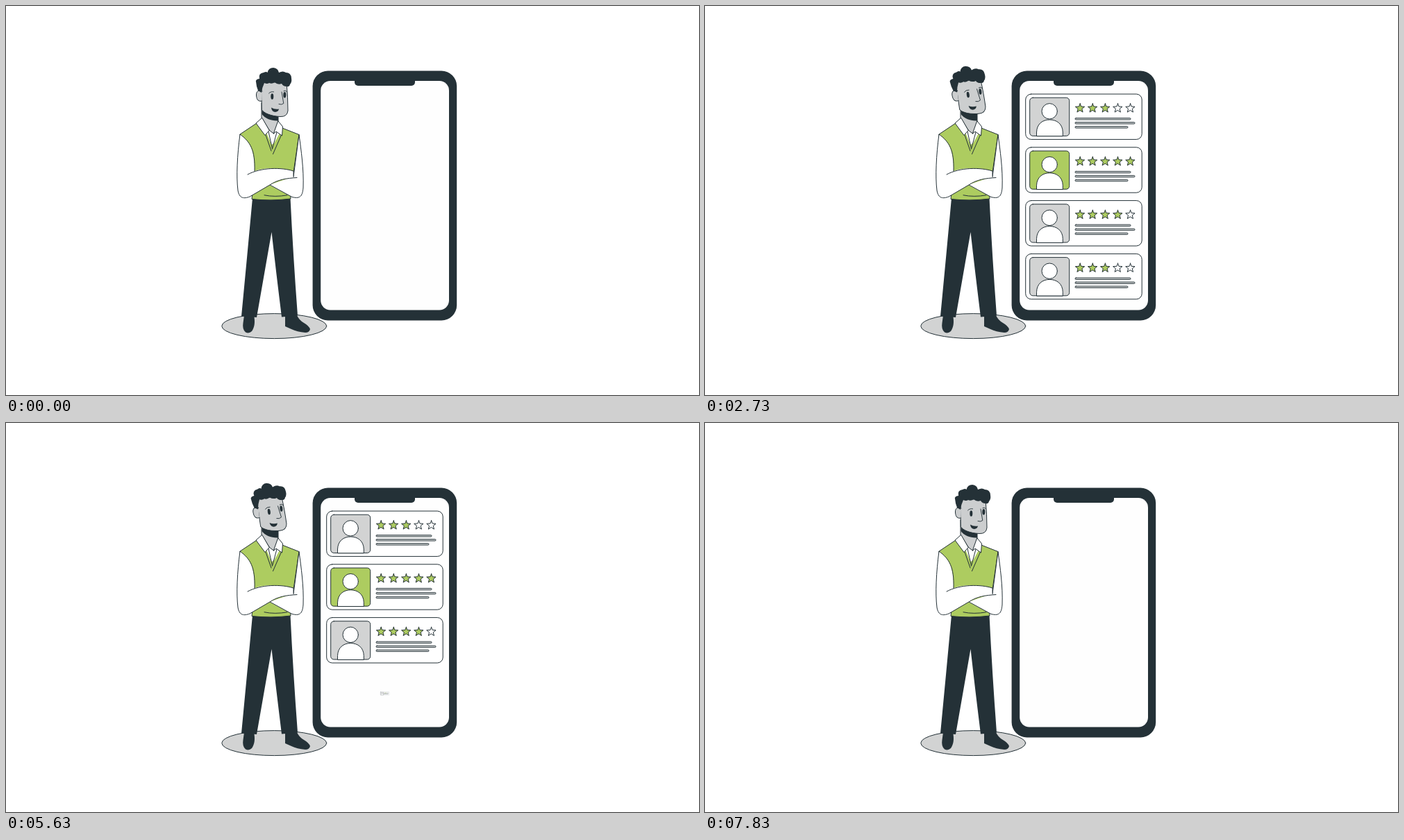
An HTML page with a canvas for the animation above (8010 ms loop, 998 by 561 pixels).

```html
<!DOCTYPE html>
<html lang="en">
<head>
<meta charset="utf-8">
<title>Reviews</title>
<style>
html, body { margin: 0; width: 100%; height: 100%; overflow: hidden; background: #fff; }
canvas { display: block; width: 998px; height: 561px; }
</style>
</head>
<body>
<canvas id="stage" width="998" height="561"></canvas>
<script>
const ctx = document.getElementById('stage').getContext('2d');
const DARK = '#243137', GREEN = '#adcc60', GREY = '#d2d3d3', SKIN = '#cccecf', WHITE = '#fff';
const LOOP = 8010, CYCLE = 4000;
const RATINGS = [3, 5, 4, 3];
const CARD_X = 545.5, CARD_Y = 159.7, PITCH = 76.8;
const GROW = 400, SHRINK = 245, LEAVE = 2735;

const clamp = v => Math.max(0, Math.min(1, v));
const span = (t, from, to) => clamp((t - from) / (to - from));
const ease = v => v * v * (3 - 2 * v);

function paint(path, fill, line, width = 1) {
  if (fill) { ctx.fillStyle = fill; ctx.fill(path); }
  if (line) { ctx.strokeStyle = line; ctx.lineWidth = width; ctx.stroke(path); }
}
const shape = (d, fill, line, width) => paint(new Path2D(d), fill, line, width);

function oval(x, y, rx, ry, fill, line, width) {
  const p = new Path2D();
  p.ellipse(x, y, rx, ry, 0, 0, Math.PI * 2);
  paint(p, fill, line, width);
}

function box(x, y, w, h, r, fill, line, width) {
  const p = new Path2D();
  p.roundRect(x, y, w, h, r);
  paint(p, fill, line, width);
}

function star(x, y, fill) {
  const p = new Path2D();
  for (let i = 0; i < 10; i++) {
    const r = i % 2 ? 3 : 7, a = i * Math.PI / 5 - Math.PI / 2;
    p.lineTo(x + r * Math.cos(a), y + r * Math.sin(a));
  }
  p.closePath();
  paint(p, fill, DARK, 1);
}

function drawPhone() {
  box(441.6, 93.5, 207.6, 359.9, 22, DARK);
  box(453.2, 108, 184.8, 330.6, 14, '#fefefe');
  box(502, 106, 87, 9, [0, 0, 5, 5], DARK);
}

function drawCard(i, scale) {
  if (scale <= 0) return;
  ctx.save();
  ctx.translate(CARD_X, CARD_Y + i * PITCH);
  ctx.scale(scale, scale);
  ctx.translate(-CARD_X, -CARD_Y);
  box(461.7, 127, 167.5, 65.4, 8, WHITE, DARK);
  box(467.7, 132.2, 57, 55.2, 4.5, i === 1 ? GREEN : GREY, DARK);
  oval(496.2, 151.8, 11.2, 11.2, WHITE, DARK);
  shape('M477.5 187.4V182C478 170 486 164 496.3 164S515 170 515.3 182V187.4Z', WHITE, DARK);
  for (let k = 0; k < 5; k++) star(540 + k * 18.1, 147.4, k < RATINGS[i] ? GREEN : WHITE);
  [80, 86, 76].forEach((w, k) => box(533, 161.6 + k * 6, w, 2.4, 1.2, '#c4c8c9', DARK, 0.9));
  ctx.restore();
}

function drawBody() {
  oval(386.3, 461.6, 75.5, 18, GREY, DARK);

  // shoes and trousers
  shape('M343 446H357C359 456 358 463 354 469Q350 473 345 470.5Q340 466 341.5 457Z', DARK);
  shape('M402 446H419Q422 453 429 457T438 466Q437 471 431 471Q419 470 411 466L402 462Z', DARK);
  shape('M355 277H409.5Q413.5 360 420 446.5L397 448.5Q389 384 382.5 326Q372 386 361 449L339 447.5Q347 364 355 277Z', DARK);

  // vest, neck and shirt front
  shape('M337 185L361 169L398 176L422 185.5L414 240L409 262L410 278Q382 281.5 354 278.5L358 240Z', GREEN, DARK);
  shape('M373 178L397 178L386 198L382.5 200Z', WHITE);
  shape('M368 140V163L379 179L385.5 184L392 174V145Z', SKIN, DARK);
  shape('M368.5 148L392 152V165.5C382 166 373 162 368.5 156Z', DARK);
  shape('M374 186L382 209M378 181L383.5 206M390 182L383.5 206M396.5 186L384.5 213.5', null, DARK);
  shape('M368.5 161.5L360 169L373 186.5L379 179.5Z', WHITE, DARK);
  shape('M392 166L398.5 174L397.5 187L389 181L385.5 184Z', WHITE, DARK);
  shape('M372 272.8Q387 276 405 272.8', null, DARK);

  // folded arms
  shape('M422 185.5C425 208 429 235 428 262C427 276 422 278 412 275.5L379 258L414 246Z', WHITE);
  shape('M414 246L422 185.5C425 208 429 235 428 262C427 276 422 278 412 275.5L380 258', null, DARK);
  shape('M337 185C333 215 331.5 246 334 266C336 278 343 278 351 275L380 258C392 250 404 248.5 419 247.5L414 246.5V238C397 232.5 372 232.5 358 238C358 208 352 196 337 185Z', WHITE);
  shape('M414 246.5V238C397 232.5 367 232.5 348 243M358 238C359 208 352 196 337 185C333 215 331.5 246 334 266C336 278 343 278 351 275L380 258C392 250 404 248.5 419 247.5', null, DARK);
}

const eye = (x, y, open) => oval(x, y, 2, 4.2 * open, DARK);

function drawHead(tilt, open) {
  ctx.save();
  ctx.translate(385, 165 - 3 * tilt);
  ctx.rotate(-7.5 * tilt * Math.PI / 180);
  ctx.translate(-385, -165);
  shape('M368 110H404Q406 132 406 151Q405 160 395 159.5C381 159 371 154 368.5 150Z', SKIN, DARK);
  shape('M369 123C364 120 360 123 360.5 129C361 136 364 138 368.5 137', SKIN, DARK);
  shape('M368 125L363 122Q360.5 116 359.8 108Q361 105 365 105Q363 97 371 96Q375 94 376.5 96Q378 89 385 89Q392 90 393 96Q399 93 403 96Q410.500 96 411 104Q412 110 409 113Q408 117 404 116Q399 116 397 112Q391 114 387 110Q383 113 379 111Q376 113 372 111Q369 117 368 125Z', DARK);
  eye(383.3, 130.5, open);
  eye(401.3, 128.3, open);
  shape('M378.5 126Q381 123 385.5 123.8M400 122.5Q402.500 121 404.5 123.5M397 124L399.8 140.5Q397 143 393 141.5', null, DARK, 0.9);
  shape('M382 146.5Q387 149.5 393 148.5C392.5 154 383 155.5 382 146.5Z', DARK);
  ctx.restore();
}

// Eyelid opening for a blink centred on c
const blink = (t, c) => 0.1 + 0.9 * clamp(Math.abs(t - c) / 75);

function draw(time) {
  const t = time % LOOP % CYCLE;
  ctx.fillStyle = WHITE;
  ctx.fillRect(0, 0, 998, 561);
  ctx.lineJoin = ctx.lineCap = 'round';

  drawBody();
  drawHead(ease(span(t, 270, 870)) - ease(span(t, 3225, 3830)), Math.min(blink(t, 897), blink(t, 2457)));
  drawPhone();
  for (let i = 0; i < 4; i++) {
    const enter = GROW * (i + 1), leave = LEAVE + SHRINK * (3 - i);
    drawCard(i, span(t, enter, enter + GROW) - span(t, leave, leave + SHRINK));
  }
}

const began = performance.now();
function tick() {
  draw(performance.now() - began);
  requestAnimationFrame(tick);
}
tick();
</script>
</body>
</html>
```
